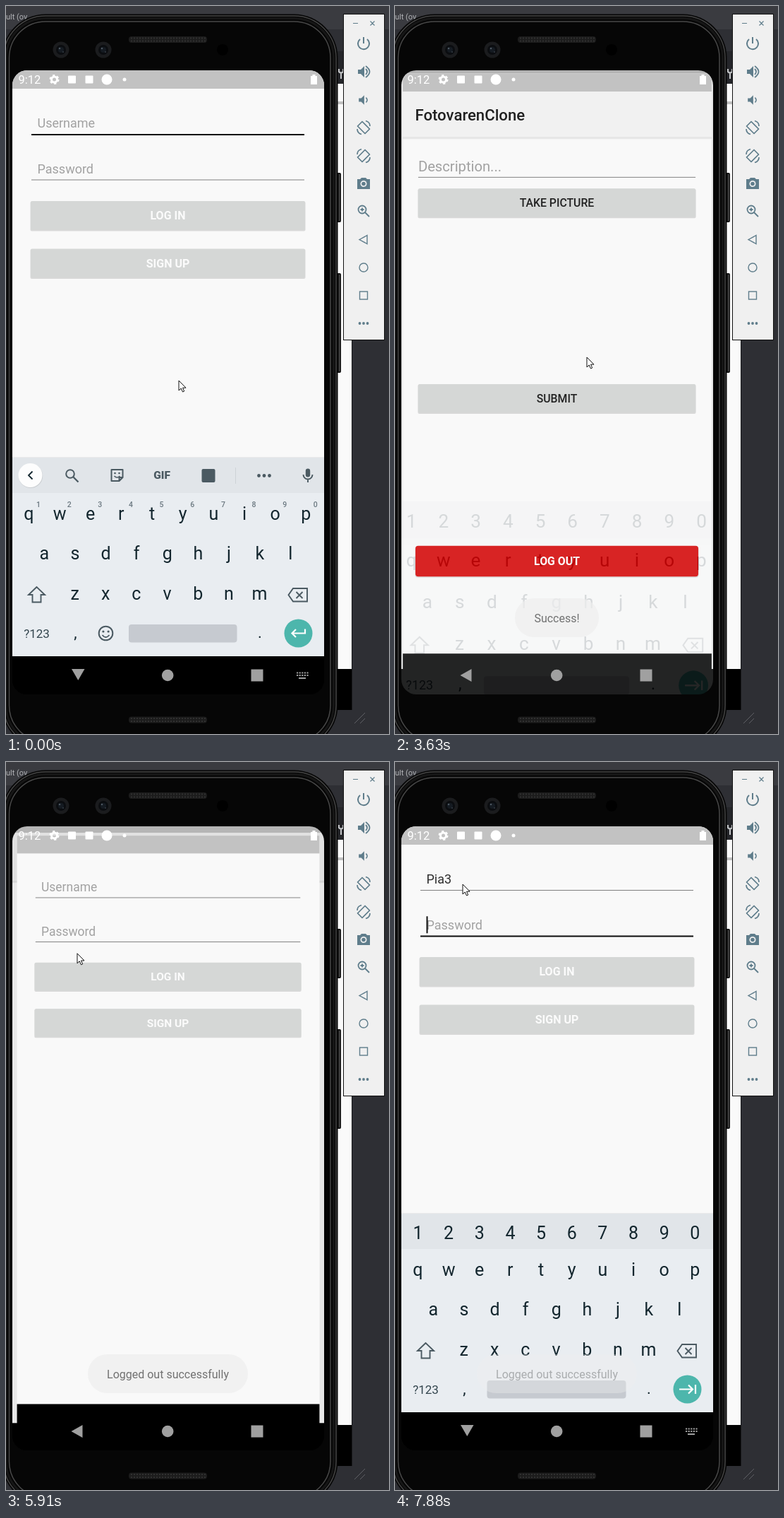
These frames come from a looping animation (543 px wide and 1030 px high, 8 s). An HTML page:

```html
<!DOCTYPE html>
<html lang="en">
<head>
<meta charset="utf-8">
<title>Phone login demo</title>
<style>
html, body { margin: 0; width: 100%; height: 100%; overflow: hidden; background: #2e2f34; }
svg { display: block; width: 543px; height: 1030px; font-family: Roboto, sans-serif; }
</style>
</head>
<body>
<svg id="stage" viewBox="0 0 543 1030" xmlns="http://www.w3.org/2000/svg"></svg>
<script>
const LOOP = 8000, OPEN = 3399, BACK = 5752;
const CX = 230, CY = 532.5;
const INK = '#13262e', ICON = '#4b5a62';

// ---------- markup helpers ----------
const rect = (x, y, w, h, fill, more = '') =>
  `<rect x="${x}" y="${y}" width="${w}" height="${h}" fill="${fill}" ${more}/>`;
const circle = (x, y, r, fill, more = '') =>
  `<circle cx="${x}" cy="${y}" r="${r}" fill="${fill}" ${more}/>`;
const text = (x, y, size, fill, str, more = '') =>
  `<text x="${x}" y="${y}" font-size="${size}" fill="${fill}" ${more}>${str}</text>`;
const mid = (x, y, size, fill, str, weight = 400) =>
  text(x, y, size, fill, str, `text-anchor="middle" font-weight="${weight}"`);
const shape = (d, fill, more = '') => `<path d="${d}" fill="${fill}" ${more}/>`;
const line = (d, color, width, more = '') =>
  `<path d="${d}" fill="none" stroke="${color}" stroke-width="${width}" ${more}/>`;
const put = (x, y, s, body) =>
  `<g transform="translate(${x} ${y}) scale(${s})">${body}</g>`;
const group = (id, body) => `<g id="${id}">${body}</g>`;
const dots = (x, y, gap, r, fill) =>
  [-1, 0, 1].map(i => circle(x + i * gap, y, r, fill)).join('');
const button = (x, y, w, h, fill, label, color, weight, r = 2) =>
  rect(x - .5, y + .5, w + 1, h + 1, '#000', `rx="${r}" opacity=".13"`) +
  rect(x, y, w, h, fill, `rx="${r}"`) +
  mid(229.5, y + h / 2 + 5.7, 16, color, label, weight);

// ---------- desktop behind the phone ----------
function desktop() {
  return rect(0, 0, 543, 1030, '#2e2f34') + rect(0, 0, 543, 33, '#3a3b40') +
    text(0, 19, 11, '#b0b2b5', 'ult (ov') +
    rect(460, 64, 31, 46, '#25262a') +
    line('M472 89v4q3 3 6 0v-4M475 94v9', '#c4c6c8', 2) +
    rect(460, 110, 31, 828, '#fafafa') + rect(460, 135, 31, 4, '#c2c2c2') +
    rect(460, 938, 31, 58, '#000') + rect(490, 110, 1, 886, '#17181a') +
    line('M494 1015l15 -15M502 1015l7 -7', '#606166', 1);
}

function phone() {
  const slot = y => rect(174, y, 111, 9, '#1c1c1c', 'rx="4"') +
    line(`M177 ${y + 2.5}h106M177 ${y + 6.5}h106`, '#303030', 2, 'stroke-dasharray="2 2"');
  const lens = x => circle(x, 62, 11.5, '#1b1c1e') + circle(x, 62, 7, '#0b0d10') +
    circle(x, 62, 4, '#151b22') + circle(x - 2, 60, 1.3, '#4c5660') + circle(x + 3, 65, 1, '#343c44');
  const knob = (y, h) => rect(467, y, 8, h, '#131313', 'rx="2"') + rect(472, y + 2, 1.5, h - 4, '#4a4a4a');
  const rim = (inset, color, width) => rect(-6 + inset, 11.5 + inset, 476.5 - 2 * inset, 1040 - 2 * inset, 'none',
    `rx="${62 - inset}" stroke="${color}" stroke-width="${width}"`);
  return knob(236, 70) + knob(378, 141) +
    rect(-6, 11.5, 476.5, 1040, '#060606', 'rx="62"') +
    rim(2.5, '#454545', 1.5) + rim(6, '#161616', 3) + rim(10.5, '#484848', 1.5) +
    slot(43) + slot(1005.5) + lens(78) + lens(138) + circle(307, 62, 8, '#000');
}

function sidebar() {
  const c = '#5f7d8b', x = 507;
  const speaker = 'M-8 -3v6h4l5 5v-16l-5 5z';
  const turn = line('M-2 -8.500L8.500 2L2 8.500L-8.500 -2zM-9 2q0 6 6 7.500M9 -2q0 -6 -6 -7.500', c, 1.7, 'stroke-linejoin="round"');
  return rect(478.5, 11.5, 58, 461, '#f0f0f0', 'stroke="#101010"') +
    line('M492 24.500h7M516.500 21.500l6 6m0 -6l-6 6', c, 1.2) +
    put(x, 53, 1, line('M0 -9v9M-5 -6a8 8 0 1 0 10 0', c, 2)) +
    put(x, 93, 1, shape(speaker, c) + line('M3 -4q4 4 0 8M3 -8q11 8 0 16', c, 1.8)) +
    put(x, 133, .85, shape(speaker, c) + line('M4 -4q4 4 0 8', c, 1.8)) +
    put(x, 172, 1, turn) + put(x, 212, '-1 1', turn) +
    put(x, 251, 1, shape('M-9 -6h4l2 -2h6l2 2h4v14h-18z', c) + circle(0, .5, 4.5, '#f0f0f0') + circle(0, .5, 2.8, c)) +
    put(x, 290, 1, circle(-2, -2, 5.5, 'none', `stroke="${c}" stroke-width="1.8"`) +
      line('M2 2l6 6M-4.500 -2h5M-2 -4.500v5', c, 1.8)) +
    line('M501 330.500l11 -6v12z', c, 1.4) +
    circle(x, 370, 6, 'none', `stroke="${c}" stroke-width="1.4"`) +
    rect(501.5, 404, 11, 11, 'none', `stroke="${c}" stroke-width="1.4"`) +
    dots(x, 449, 5.5, 1.9, c);
}

// ---------- app screens ----------
const blank = rect(9, 91, 442, 829, '#f9f9f9') + rect(9, 91, 442, 26, '#c2c2c2') +
  rect(9, 920, 442, 54, '#000');

function field(id, y, hint) {
  return group(id + 'Hint', text(44.5, y, 18, '#a2a2a2', hint)) +
    `<text id="${id}Text" x="44.5" y="${y}" font-size="18" fill="#303030"></text>` +
    `<rect id="${id}Line" x="36" y="${y + 8.7}" width="387"/>` +
    `<rect id="${id}Caret" y="${y - 18.5}" width="2" height="24" fill="#111"/>`;
}

const loginPage = () => blank + field('user', 172.3, 'Username') + field('pass', 236.8, 'Password') +
  button(35, 276, 389, 41, '#d5d7d6', 'LOG IN', '#fbfbfb', 700) +
  button(35, 343.5, 389, 41, '#d5d7d6', 'SIGN UP', '#fbfbfb', 700);

const mainPage = () => blank + rect(9, 117, 442, 66, '#f1f1f1') +
  rect(9, 182, 442, 3, '#000', 'opacity=".07"') +
  text(26.5, 158, 22.4, '#212121', 'FotovarenClone', 'font-weight="500"') +
  text(31, 231, 20.4, '#a2a2a2', 'Description...') + rect(31, 239, 397, 1, '#808080') +
  button(31, 255.5, 397, 41, '#d5d7d6', 'TAKE PICTURE', '#222', 500) +
  button(31, 535, 397, 41, '#d5d7d6', 'SUBMIT', '#222', 500) +
  button(27, 766, 405, 44, '#d50000', 'LOG OUT', '#fff', 700, 4);

// ---------- keyboard ----------
function keyboard() {
  const row = (str, x, y, size = 25, fill = INK, weight) =>
    [...str].map((ch, i) => mid(x + 43.65 * i, y, size, fill, ch, weight)).join('');
  const chevron = `<path id="chevron" d="M3 -5.500l-5.500 5.500l5.500 5.500" fill="none" stroke="${INK}" stroke-width="1.8"/>`;
  const tools = put(93, 664, 1, circle(-2, -2, 5.8, 'none', `stroke="${ICON}" stroke-width="2"`) + line('M2.500 2.500l7 7', ICON, 2.3)) +
    put(157.5, 664, 1, line('M8 3v-11h-16v16h11zl-5 0v5', ICON, 2, 'stroke-linejoin="round"') +
      circle(-3, -3, 1.3, ICON) + circle(3, -3, 1.3, ICON) + line('M-4 1q4 4 8 0', ICON, 1.6)) +
    mid(221, 669.3, 15.5, ICON, 'GIF', 900) +
    rect(277.5, 655, 19, 19, ICON, 'rx="2"') +
    rect(325, 653, 1, 23, '#cdd2d6') + dots(366, 664.5, 7.5, 2.4, ICON);
  const words = [110, 229.5, 345].map(x =>
    `<text class="word" x="${x}" y="670" font-size="17" text-anchor="middle" fill="${INK}"></text>`).join('') +
    rect(169, 654, 1, 21, '#cdd2d6') + rect(289, 654, 1, 21, '#cdd2d6');
  const mic = put(428, 664, 1, rect(-3.2, -9.5, 6.4, 12, ICON, 'rx="3.2"') +
    line('M-6.500 -1a6.500 6.500 0 0 0 13 0M0 5.500v4.500', ICON, 1.9));
  const bar = circle(35, 664.8, 17.2, '#000', 'opacity=".1"') + circle(34.5, 664, 17, '#fdfdfd') +
    put(34.5, 664, 1, chevron) + mic;
  const smile = put(141.5, 887.5, 1, circle(0, 0, 9.8, 'none', `stroke="${ICON}" stroke-width="2"`) +
    circle(-3.6, -2.5, 1.6, ICON) + circle(3.6, -2.5, 1.6, ICON) + line('M-5 2.500q5 6 10 0', ICON, 1.8));
  return rect(9, 638, 442, 1, '#000', 'opacity=".06"') +
    rect(9, 639, 442, 281, '#e9edf1') + rect(9, 639, 442, 50, '#e1e5e9') + rect(9, 920, 442, 54, '#000') +
    group('plain', bar + group('tools', tools) + group('words', words) +
      row('1234567890', 46, 708.5, 10.5, '#6b7880', 500) + smile) +
    group('digits', row('1234567890', 32.5, 674.5)) +
    row('qwertyuiop', 32.4, 727) + row('asdfghjkl', 54.2, 783) + row('zxcvbnm', 97.6, 840) +
    mid(43.5, 893.5, 17, '#33454e', '?123') + mid(98.5, 893.5, 22, INK, ',') + mid(360, 893.5, 22, INK, '.') +
    line('M43.500 822l-11.500 11h5.500v10.500h12v-10.500h5.500z', ICON, 1.9) +
    line('M407 824h20v18.500h-20l-6.500 -9.250zM411.500 829l9 9m0 -9l-9 9', ICON, 1.9) +
    `<rect id="space" y="875" height="25.500" rx="4" fill="#c6cad0"/>` +
    circle(414.5, 887.5, 20, '#4db6ac') +
    `<path id="enter" fill="none" stroke="#fff" stroke-width="2.2"/>`;
}

// ---------- system overlay ----------
function statusIcons() {
  const w = '#fff';
  return text(17.5, 110, 16.5, w, '9:12') +
    circle(68.5, 104, 4, 'none', `stroke="${w}" stroke-width="3"`) +
    circle(68.5, 104, 6, 'none', `stroke="${w}" stroke-width="2" stroke-dasharray="3.140 3.143"`) +
    rect(88, 98.5, 11, 11, w, 'rx="1"') + rect(112.5, 98.5, 11, 11, w, 'rx="1"') +
    circle(143, 104, 7.5, w) + circle(168, 104, 2.5, w) +
    shape('M432 99h2.500v-2h4v2h2.500v12h-9z', w);
}

function navIcons() {
  const c = '#a0a0a0';
  return circle(229.2, 947, 8.3, c) + rect(347.5, 938.5, 17, 17, c) +
    group('navBack', shape('M92.500 947l16 -9v18z', c)) +
    group('navHide', shape('M93 938h18.500l-9.250 16z', c) +
      line('M412 943.500h17M412 947h17', c, 2, 'stroke-dasharray="2.200 1.400"') +
      line('M415 951h10', c, 2));
}

const toast = (id, label, w) => group(id,
  rect(229.5 - w / 2, 838, w, 55, '#eee', 'rx="27.5" opacity=".94"') + mid(229.5, 872, 16, '#444', label));

const stage = document.getElementById('stage');
stage.innerHTML = `<defs><clipPath id="screen">${rect(9, 91, 442, 883, '#000', 'rx="21"')}</clipPath></defs>` +
  desktop() + phone() +
  `<g clip-path="url(#screen)">` + rect(9, 91, 442, 883, '#000') +
  group('pages', group('login', loginPage()) + group('main', mainPage())) +
  group('kb', keyboard()) + statusIcons() + navIcons() +
  toast('hello', 'Success!', 119) + toast('bye', 'Logged out successfully', 227) + '</g>' + sidebar() +
  group('mouse', shape('M0 0v14l3.200 -3l2.300 5l2.200 -1l-2.200 -4.800h4.500z', '#fff', 'stroke="#111"'));

const el = {};
stage.querySelectorAll('[id]').forEach(n => el[n.id] = n);
const wordEls = stage.querySelectorAll('.word');

// ---------- timing ----------
const clamp = v => Math.max(0, Math.min(1, v));

// The screen refreshes in bursts: start, end, number of refreshes.
const bursts = [[0, 0, 1], [120, 810, 6], [1240, 1240, 1], [1550, 1550, 1], [1850, 1970, 2],
  [2500, 2500, 1], [2810, 2960, 2], [3240, 4170, 8], [4320, 5220, 8], [5370, 6330, 8],
  [6450, 7020, 5], [7300, 7450, 2], [7730, 7880, 2]];
function snap(t) {
  const [a, b, n] = bursts.filter(s => s[0] <= t).pop();
  const step = n > 1 ? (b - a) / (n - 1) : 1;
  return a + step * Math.min(n - 1, Math.floor((t - a + 20) / step));
}

// Time, user name, password, focused field, caret shown.
const NAME = 'Pia3';
const states = [[0, '', '', 'user', 0], [120, '', '', 'user', 1], [250, 'P', '', 'user', 1],
  [390, 'Pi', '', 'user', 1], [530, 'Pia', '', 'user', 1], [800, NAME, '', 'user', 1],
  [1240, NAME, '', 'pass', 1], [1550, NAME, '•i', 'pass', 1], [1850, NAME, '••a', 'pass', 1],
  [1960, NAME, '•••3', 'pass', 1], [2500, NAME, '•••3', 'pass', 0], [2810, NAME, '•••3', 'pass', 1],
  [BACK, '', '', '', 0], [6450, '', '', 'user', 1], [6870, 'P', '', 'user', 1],
  [7010, 'Pi', '', 'user', 1], [7300, 'Pia', '', 'user', 1], [7440, NAME, '', 'user', 1],
  [7730, NAME, '', 'pass', 1]];

const guesses = { P: ['Pm', 'P', 'Pl'], Pi: ['Pick', 'Pi', 'Pink'], Pia: ['Piano', 'Pia', 'Pian'], [NAME]: ['', NAME, ''] };

const path = [[0, 245, 530], [2740, 245, 530], [2960, 231, 347], [3200, 231, 347], [3240, 232, 300],
  [3370, 232, 300], [3638, 272, 497], [4170, 268, 440], [4450, 108, 154], [4700, 200, 270],
  [4960, 344, 545], [5220, 300, 770], [5370, 304, 775], [5500, 304, 775], [5918, 101, 271],
  [6200, 96, 173], [LOOP, 96, 173]];
function mouseAt(t) {
  const i = path.findIndex(p => p[0] > t);
  const [a, ax, ay] = path[i - 1], [b, bx, by] = path[i];
  const k = (t - a) / (b - a);
  return [ax + (bx - ax) * k, ay + (by - ay) * k];
}

// ---------- drawing ----------
const show = (node, on) => node.setAttribute('visibility', on ? 'inherit' : 'hidden');
const fade = (node, a) => { node.setAttribute('opacity', a); show(node, a > 0); };
const zoom = (node, s, dy = 0) =>
  node.setAttribute('transform', `translate(${CX} ${CY + dy}) scale(${s}) translate(${-CX} ${-CY})`);

function drawField(id, value, focused, caret) {
  const bar = el[id + 'Line'], txt = el[id + 'Text'], mark = el[id + 'Caret'];
  txt.textContent = value;
  show(el[id + 'Hint'], !value);
  bar.setAttribute('height', focused ? 2 : 1);
  bar.setAttribute('fill', focused ? '#0c0c0c' : '#808080');
  mark.setAttribute('x', value ? 44 + txt.getComputedTextLength() : 44.5);
  show(mark, focused && caret);
}

function enterPage(node, old, t, start) {
  const p = 1 - (1 - clamp((t - start) / 400)) ** 3;
  zoom(node, .85 + .15 * p);
  fade(node, clamp((t - start - 20) / 60));
  zoom(old, 1 + .05 * p);
  fade(old, p < 1 ? 1 - .08 * p : 0);
  el.pages.append(node);
  return p;
}

function draw(now) {
  const t = snap(now);
  const [, user, pass, focus, caret] = states.filter(s => s[0] <= t).pop();
  drawField('user', user, focus === 'user', caret);
  drawField('pass', pass, focus === 'pass', caret);

  const p = t < BACK ? enterPage(el.main, el.login, t, OPEN) : enterPage(el.login, el.main, t, BACK);

  if (t < BACK) {
    const q = clamp((t - OPEN) / 281);
    zoom(el.kb, 1 + .05 * p, 67 * q);
    fade(el.kb, 1 - q);
  } else {
    const q = clamp((t - 6500) / 200);
    zoom(el.kb, 1, 60 * (1 - q));
    fade(el.kb, q);
  }
  const secret = focus === 'pass';
  const typing = !secret && user;
  show(el.plain, !secret);
  show(el.digits, secret);
  show(el.tools, !secret && !typing);
  show(el.words, typing);
  wordEls.forEach((w, i) => w.textContent = typing ? guesses[user][i] : '');
  el.chevron.setAttribute('transform', typing ? 'scale(-1 1)' : '');
  el.space.setAttribute('x', secret ? 130.5 : 174);
  el.space.setAttribute('width', secret ? 197 : 153.5);
  el.enter.setAttribute('d', secret
    ? 'M403 887.500h18M416 881.500l6 6l-6 6M426 881v13'
    : 'M424 881.500v6h-18M411 882l-5.500 5.500l5.500 5.500');

  const keys = t < OPEN || t >= 6500;
  show(el.navHide, keys);
  show(el.navBack, !keys);
  fade(el.hello, Math.min(clamp((t - 3500) / 185), clamp((5700 - t) / 250)));
  fade(el.bye, Math.min(clamp((t - 5780) / 185), clamp((7990 - t) / 290)));
  el.mouse.setAttribute('transform', `translate(${mouseAt(t)})`);
}

const begin = performance.now();
function tick() {
  draw((performance.now() - begin) % LOOP);
  requestAnimationFrame(tick);
}
tick();
</script>
</body>
</html>
```
